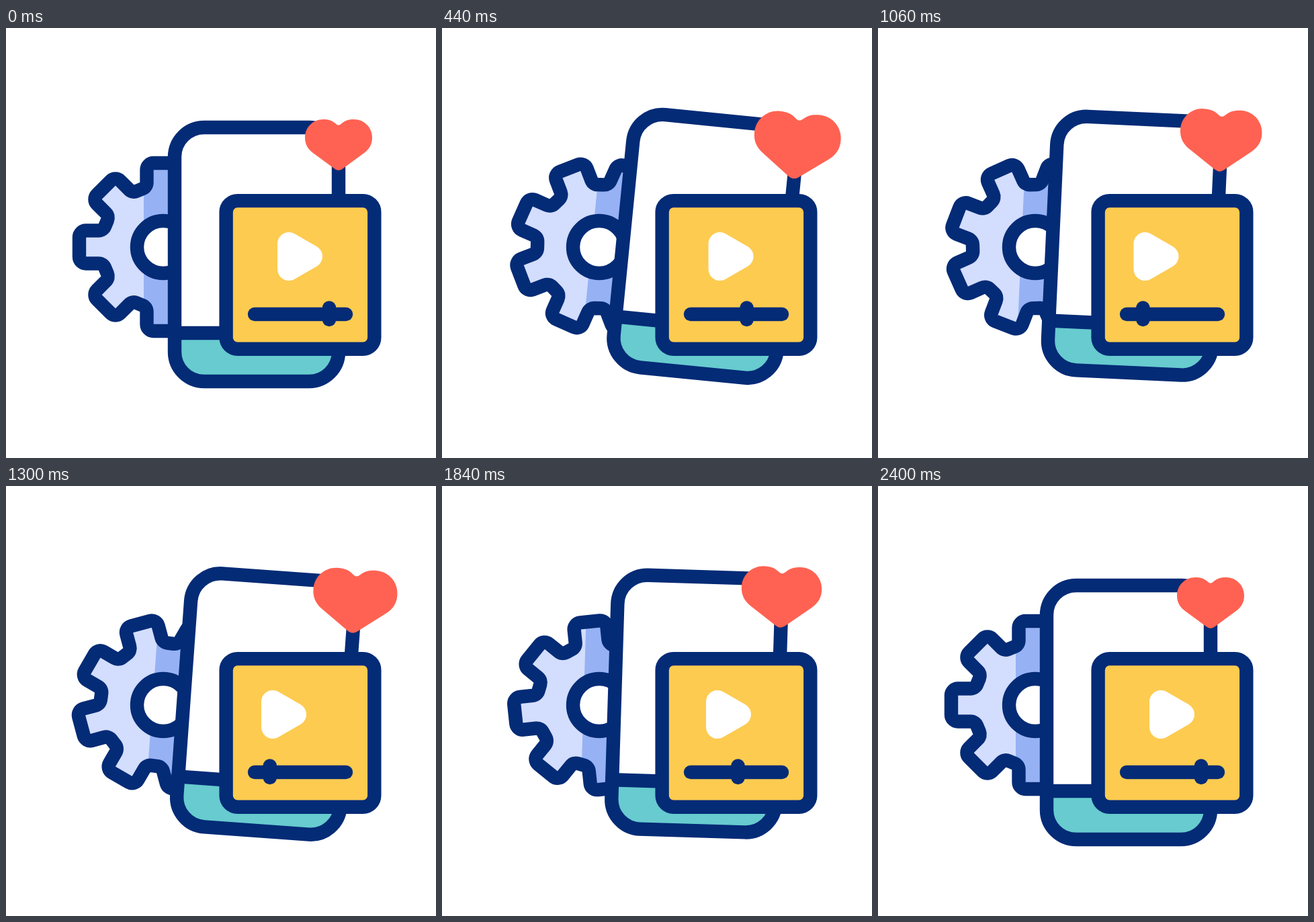
These frames come from a looping animation (640 px wide and 640 px high, 2.42 s). An HTML page with a canvas:

```html
<!DOCTYPE html>
<html lang="en">
<head>
<meta charset="utf-8">
<title>Video settings</title>
<style>
  html, body { margin: 0; width: 100%; height: 100%; overflow: hidden; background: #fff; }
  canvas { display: block; width: 640px; height: 640px; }
</style>
</head>
<body>
<canvas id="stage" width="640" height="640"></canvas>
<script>
const ctx = document.getElementById('stage').getContext('2d');

const NAVY = '#042b76', WHITE = '#fff', TEAL = '#67cbcf', YELLOW = '#fdcb50';
const RED = '#ff6252', LIGHT = '#d3ddfd', SHADE = '#96b2f4';

const LOOP = 2420, CYCLE = 2400, STEP = 20, BEAT = 400;
const RAD = Math.PI / 180;
const GEAR = { x: 234, y: 326 };
const PIVOT = { x: 373, y: 523 };
const HEART = { x: 498, y: 171 };

const ease = u => u * u * (3 - 2 * u);
const mix = (a, b, u) => a + (b - a) * u;

// Eased value at time t, one key per beat; the last beat may end early.
function keyed(keys, t, lastBeat = BEAT) {
  const last = keys.length - 2;
  const i = Math.min(Math.floor(t / BEAT), last);
  const length = i === last ? lastBeat : BEAT;
  return mix(keys[i], keys[i + 1], ease(Math.min((t - i * BEAT) / length, 1)));
}

function paint(path, fill, stroke) {
  if (fill) {
    ctx.fillStyle = fill;
    ctx.fill(path);
  }
  if (stroke) {
    ctx.strokeStyle = stroke;
    ctx.stroke(path);
  }
}

function roundBox(x, y, w, h, r) {
  const path = new Path2D();
  path.roundRect(x, y, w, h, r);
  return path;
}

function segment(x1, y1, x2, y2) {
  ctx.strokeStyle = NAVY;
  ctx.beginPath();
  ctx.moveTo(x1, y1);
  ctx.lineTo(x2, y2);
  ctx.stroke();
}

function makeGear(teeth, tip, root, half, radius) {
  const points = [];
  for (let i = 0; i < teeth; i++) {
    const a = i * 2 * Math.PI / teeth;
    for (const [x, y] of [[root, -half], [tip, -half], [tip, half], [root, half]]) {
      points.push([x * Math.cos(a) - y * Math.sin(a), x * Math.sin(a) + y * Math.cos(a)]);
    }
  }
  const path = new Path2D();
  const n = points.length;
  path.moveTo((points[n - 1][0] + points[0][0]) / 2, (points[n - 1][1] + points[0][1]) / 2);
  points.forEach((p, i) => path.arcTo(...p, ...points[(i + 1) % n], radius));
  path.closePath();
  return path;
}

const gearPath = makeGear(8, 125, 89.4, 24.5, 10);
const ringPath = new Path2D();
ringPath.arc(GEAR.x, GEAR.y, 39, 0, 2 * Math.PI);
const phonePath = roundBox(251, 148, 244, 378, 44);
const cardPath = roundBox(327.6, 257.1, 220.7, 220.7, 17);
const playPath = new Path2D('M421 321 L454 340 L421 359 Z');
const heartPath = new Path2D(
  'M495 144.5 C490 144.5 489 136 472 136 C457 136 445 148 445 163' +
  ' C445 173 449 180 457 186 L489 209.5 C493 212.5 497 212.5 501 209.5' +
  ' L533 186 C541 180 545 173 545 163 C545 148 533 136 518 136 C501 136 500 144.5 495 144.5 Z');

function phoneSpace(angle, lift) {
  ctx.translate(PIVOT.x, PIVOT.y - lift);
  ctx.rotate(angle);
  ctx.translate(-PIVOT.x, -PIVOT.y);
}

function drawGear(t, angle, lift) {
  // The axle sits slightly off the centre of the wheel.
  const axle = { x: 0.6, y: 0.4 };
  const wheel = new Path2D();
  const spin = new DOMMatrix()
    .translate(GEAR.x - axle.x, GEAR.y - axle.y)
    .rotate(-360 * t / CYCLE)
    .translate(axle.x, axle.y);
  wheel.addPath(gearPath, spin);
  paint(wheel, LIGHT);

  ctx.save();
  ctx.clip(wheel);
  phoneSpace(angle, lift);
  ctx.fillStyle = SHADE;
  ctx.fillRect(205, 0, 400, 640);
  ctx.restore();

  paint(wheel, null, NAVY);
  paint(ringPath, WHITE, NAVY);
}

function drawPhone(angle, lift, heartScale) {
  ctx.save();
  phoneSpace(angle, lift);
  paint(phonePath, WHITE);
  ctx.save();
  ctx.clip(phonePath);
  ctx.fillStyle = TEAL;
  ctx.fillRect(251, 454, 244, 72);
  ctx.restore();
  segment(251, 454, 495, 454);
  paint(phonePath, null, NAVY);

  ctx.translate(HEART.x, HEART.y);
  ctx.scale(heartScale, heartScale);
  ctx.translate(-HEART.x, -HEART.y);
  paint(heartPath, RED);
  ctx.restore();
}

function drawCard(t) {
  const slide = ease(1 - Math.abs(1 - 2 * t / CYCLE));
  const knob = 481 - 90 * slide;
  paint(cardPath, YELLOW, NAVY);
  segment(370, 426, 506, 426);
  segment(knob, 416.5, knob, 434);

  ctx.save();
  ctx.translate(-24.5 * slide, 0);
  ctx.lineWidth = 34;
  paint(playPath, WHITE, WHITE);
  ctx.restore();
}

function draw(t) {
  const angle = keyed([0, 6, -6, 6, -6, 6, 0], t) * RAD;
  const lift = keyed([0, 13, 13, 13, 13, 13, 0], t);
  const heartScale = keyed([1, 1.3, 1, 1.3, 1, 1.3, 1], t, 240);

  ctx.fillStyle = WHITE;
  ctx.fillRect(0, 0, 640, 640);
  ctx.lineWidth = 20.4;
  ctx.lineCap = ctx.lineJoin = 'round';
  drawGear(t, angle, lift);
  drawPhone(angle, lift, heartScale);
  drawCard(t);
}

let start = null;
function tick(now) {
  if (start === null) start = now;
  const t = Math.max(now - start, 0) % LOOP;
  draw(Math.min(Math.floor(t / STEP) * STEP, CYCLE));
  requestAnimationFrame(tick);
}
draw(0);
requestAnimationFrame(tick);
</script>
</body>
</html>
```
